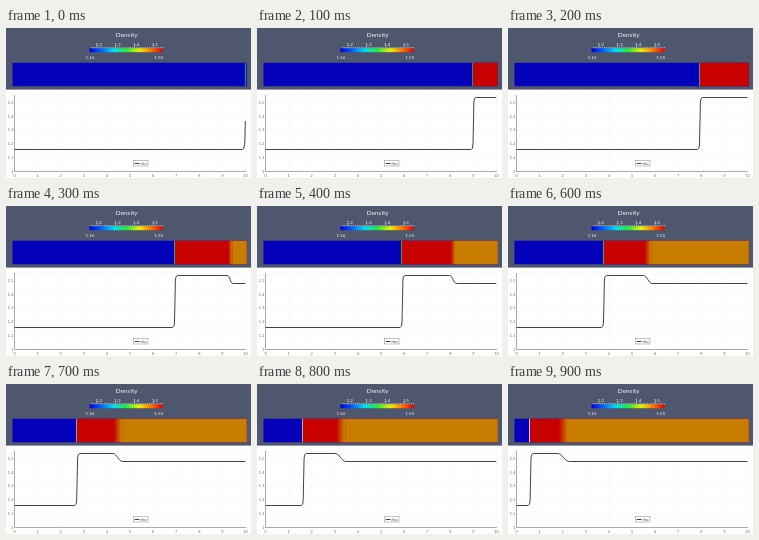
An HTML page that plays this animation: 245 by 150 pixels, repeating every 1 s.

```html
<!DOCTYPE html>
<html lang="en">
<head>
<meta charset="utf-8">
<title>Density</title>
<style>
html, body { margin: 0; width: 100%; height: 100%; overflow: hidden; background: #fffffd; }
svg { display: block; width: 245px; height: 150px; }
text { font-family: Lato, "Open Sans", sans-serif; text-anchor: middle; }
.bar text { fill: #f2f2f5; }
.axis text { font-family: "Liberation Sans", sans-serif; font-size: 4px; fill: #666; }
.axis .side { text-anchor: end; }
</style>
</head>
<body>
<svg viewBox="0 0 245 150">
  <defs>
    <linearGradient id="rainbow">
      <stop offset="0" stop-color="#0000d8"/>
      <stop offset=".16" stop-color="#0060ff"/>
      <stop offset=".34" stop-color="#00e0f0"/>
      <stop offset=".5" stop-color="#20e840"/>
      <stop offset=".68" stop-color="#e8f000"/>
      <stop offset=".84" stop-color="#ff7800"/>
      <stop offset="1" stop-color="#e00000"/>
    </linearGradient>
    <linearGradient id="fan">
      <stop offset="0" stop-color="#c80000"/>
      <stop offset=".85" stop-color="#c87c00"/>
    </linearGradient>
    <clipPath id="tube"><rect x="6.5" y="34.7" width="234.3" height="23.5"/></clipPath>
  </defs>
  <rect width="245" height="61.6" fill="#4e576e"/>
  <g class="bar" id="bar">
    <text x="120.7" y="9.2" font-size="6.4">Density</text>
    <rect x="83.5" y="20.2" width="73" height="4" fill="url(#rainbow)"/>
    <path id="ticks" stroke="#e8e8ee" stroke-width=".6" fill="none"/>
    <text x="84" y="31" font-size="4.6">1.16</text>
    <text x="152.8" y="31" font-size="4.6">1.55</text>
  </g>
  <g clip-path="url(#tube)">
    <rect x="6" y="34" width="236" height="25" fill="#0400ba"/>
    <rect id="red" y="34" width="245" height="25" fill="#c80000"/>
    <rect id="blend" y="34" height="25" fill="url(#fan)"/>
    <rect id="orange" y="34" width="245" height="25" fill="#c87c00"/>
    <rect id="front" y="34" width="1" height="25"/>
  </g>
  <g class="axis" id="axis">
    <path id="grid" stroke="#ededeb" stroke-width=".6" stroke-dasharray="1 1" fill="none"/>
    <path d="M8.5 67V143.5H240" stroke="#888" stroke-width=".7" fill="none"/>
  </g>
  <path id="curve" stroke="#222" stroke-width=".85" stroke-linejoin="round" fill="none"/>
  <rect x="127.5" y="132.5" width="14.5" height="5.5" fill="#fff" stroke="#999" stroke-width=".6"/>
  <path d="M128.7 135.5H133.5" stroke="#111" stroke-width=".8"/>
  <text x="137.6" y="136.7" font-size="4" fill="#444">rho</text>
</svg>
<script>
const $ = id => document.getElementById(id);
const set = (id, attrs) => {
  for (const k in attrs) $(id).setAttribute(k, attrs[k]);
};

function label(parent, x, y, str, attrs = {}) {
  const t = document.createElementNS("http://www.w3.org/2000/svg", "text");
  for (const [k, v] of Object.entries({ x, y, ...attrs })) t.setAttribute(k, v);
  t.textContent = str;
  $(parent).append(t);
}

// Colour scale
let ticks = "";
for (let v = 117; v <= 155; v++) {
  const x = 83.5 + (v - 116) / 39 * 73;
  const major = v % 10 === 0;
  ticks += `M${x} 20.3V${major ? 17.8 : 19}`;
  if (major) label("bar", x + 1.7, 17.8, (v / 100).toFixed(1), { "font-size": 4.6 });
}
set("ticks", { d: ticks });

// Plot axes
let grid = "M8.5 67.5H240";
for (let i = 0; i <= 10; i++) {
  const x = 8.5 + i * 23.1;
  grid += `M${x} 67V143`;
  label("axis", x, 148.7, i);
}
for (let i = 0; i <= 5; i++) {
  const y = 143.5 - i * 13.85;
  grid += `M8 ${y}H240`;
  label("axis", 7.4, y + 1.4, i ? "1." + i : "1", { class: "side" });
}
set("grid", { d: grid });

const LOW = 121.5, HIGH = 69.5, MID = 77.5, END = 239.3;
const shocks = [239, 215.5, 191, 168, 144.5, 120, 95, 70.2, 45.7, 21.6];
const fronts = ["#009c9c", "#00a878", "#20a8b0", "#20a890", "#30b020",
                "#30b070", "#20b080", "#a09890", "#b8aca0", "#c8d0e8"];

function draw(step) {
  const s = shocks[step];
  const head = 193.8 - (step - 4) * 28.6;
  const tail = 199 - (step - 4) * 27.6;
  set("red", { x: step ? s : 245 });
  set("blend", { x: head, width: tail - head });
  set("orange", { x: tail });
  set("front", { x: Math.floor(s), fill: fronts[step] });

  let d = `M8.5 ${LOW}H`;
  if (step === 0) {
    d += `236.5Q238.6 ${LOW} 238.9 112L${END} 93`;
  } else {
    const x = s + 0.6;
    d += `${x - 2}Q${x - 0.3} ${LOW} ${x - 0.1} 116L${x + 0.8} 74Q${x + 1} ${HIGH} ${x + 3} ${HIGH}`;
    if (head < END) {
      const w = (tail - head) / 3;
      d += `H${head - 1}C${head + w} ${HIGH} ${tail - w - 1} ${MID} ${tail + 0.5} ${MID}`;
    }
    d += `H${END}`;
  }
  set("curve", { d });
}

let last = -1;
function tick() {
  const step = Math.floor(performance.now() % 1000 / 100);
  if (step !== last) draw(last = step);
  requestAnimationFrame(tick);
}
tick();
</script>
</body>
</html>
```
